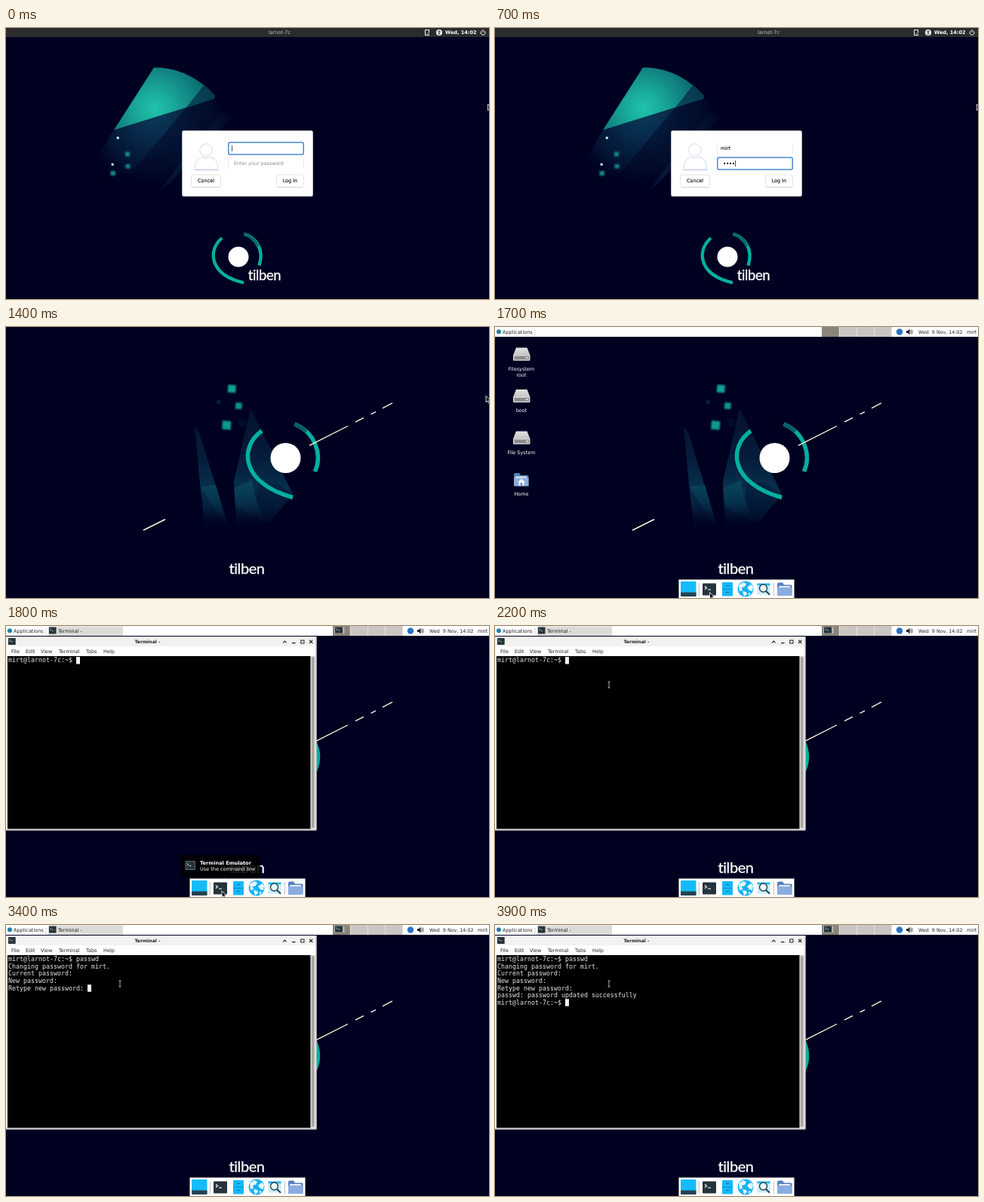
Recreate the animation shown at these times as an HTML page. Size 640 px wide and 360 px high, loop 4 s.

```html
<!DOCTYPE html>
<html lang="en">
<head>
<meta charset="utf-8">
<title>Password change</title>
<style>
html, body { margin: 0; width: 100%; height: 100%; overflow: hidden; background: #000021; }
svg { display: block; width: 640px; height: 360px; }
text { font: 6.5px "DejaVu Sans", sans-serif; fill: #222; white-space: pre; }
.b { font-weight: bold; }
.mid { text-anchor: middle; }
.lite text { fill: #fff; }
.word { font: 20px Lato, "Open Sans", sans-serif; fill: #fff; stroke: #fff; stroke-width: .3; text-anchor: middle; letter-spacing: -.4px; }
.mono { font: 8.3px "DejaVu Sans Mono", monospace; fill: #e8e8e8; }
</style>
</head>
<body>
<svg viewBox="0 0 640 360">
<defs>
  <radialGradient id="glow" gradientUnits="userSpaceOnUse" cx="197" cy="107" r="84">
    <stop offset="0" stop-color="#1fc4ac"/><stop offset=".3" stop-color="#19a899"/><stop offset=".65" stop-color="#108080"/><stop offset="1" stop-color="#0a5663"/>
  </radialGradient>
  <radialGradient id="haze" gradientUnits="userSpaceOnUse" cx="197" cy="112" r="108">
    <stop offset="0" stop-color="#0a3a5a"/><stop offset=".35" stop-color="#072849"/><stop offset=".7" stop-color="#041737" stop-opacity=".8"/><stop offset="1" stop-color="#000021" stop-opacity="0"/>
  </radialGradient>
  <linearGradient id="strip" gradientUnits="userSpaceOnUse" x1="290" y1="112" x2="205" y2="216">
    <stop offset="0" stop-color="#04102f" stop-opacity=".4"/><stop offset=".5" stop-color="#061d3d"/><stop offset="1" stop-color="#030f2f"/>
  </linearGradient>
  <linearGradient id="blade" gradientUnits="userSpaceOnUse" x1="0" y1="108" x2="0" y2="274">
    <stop offset="0" stop-color="#04122f"/><stop offset=".4" stop-color="#051d3b"/><stop offset=".64" stop-color="#06304d"/>
    <stop offset=".8" stop-color="#052443" stop-opacity=".8"/><stop offset="1" stop-color="#000021" stop-opacity="0"/>
  </linearGradient>
  <linearGradient id="lit" gradientUnits="userSpaceOnUse" x1="0" y1="200" x2="0" y2="270">
    <stop offset="0" stop-color="#0a5062"/><stop offset=".45" stop-color="#083c55" stop-opacity=".8"/><stop offset="1" stop-color="#000021" stop-opacity="0"/>
  </linearGradient>
  <linearGradient id="metal" x1="0" y1="0" x2="0" y2="1">
    <stop offset="0" stop-color="#e4e4e4"/><stop offset="1" stop-color="#c2c2c2"/>
  </linearGradient>
  <filter id="soft" x="-1" y="-1" width="3" height="3"><feGaussianBlur stdDeviation=".8"/></filter>

  <g id="term">
    <rect width="18" height="16" rx="1" fill="#25343c"/>
    <path d="M3 4l2.500 2L3 8M7 8.500h4" fill="none" stroke="#fff" stroke-width="1.200"/>
  </g>
  <g id="drive">
    <path d="M4 0h14.500l4 10H0z" fill="url(#metal)"/>
    <rect y="9.500" width="22.500" height="7.800" rx="1.200" fill="#d6d6d6"/>
    <rect x="1.500" y="11" width="19.500" height="4.800" fill="#8c8c8c"/>
    <rect x="17" y="12.300" width="2.500" height="2" fill="#e9e9e9"/>
  </g>
  <g id="folder">
    <path d="M0 2q0-2 2-2h5l2 3h9q1.500 0 1.500 1.500V17H0z" fill="#5680bd"/>
    <path d="M2 4.500h15v3H2z" fill="#e6ebf5"/>
    <path d="M0 6.500h19.500V16.500q0 1-1 1H1q-1 0-1-1z" fill="#8aace0"/>
  </g>
</defs>

<rect width="640" height="360" fill="#000021"/>

<g id="login">
  <path d="M143 135.500L239 105.500L276 94Q290 104 298 120L204 216L116 182Z" fill="url(#haze)"/>
  <path d="M239 105.500L276 94Q290 104 298 120L204 216L160 200Z" fill="#000021" opacity=".45"/>
  <path d="M196 52.500Q242 52 277 90L276 94L143 135.500Z" fill="url(#glow)"/>
  <path d="M263 75Q271 82 277 90L276 94L239 105.500Z" fill="#052a45" opacity=".7"/>
  <path d="M284 112Q293 112 298 120L218 205L204 216L232 178Z" fill="url(#strip)"/>
  <g filter="url(#soft)" fill="#0f8a83">
    <rect x="158" y="164.500" width="6" height="6"/><rect x="158.500" y="181" width="6" height="5.500"/><rect x="138.500" y="190" width="6.500" height="6"/>
  </g>
  <g fill="#c4fff4"><rect x="146.700" y="144.500" width="3" height="3"/><rect x="139.700" y="179.700" width="3" height="3"/></g>
  <g fill="none" stroke="#02b0a0" stroke-width="4.300">
    <path d="M286 279C266.500 296 270 328 315 338.300"/>
    <path d="M315.500 273.500C331 278 342.500 294 335.500 315.500"/>
    <path d="M315.500 273.500Q328 277.500 334 290" stroke="#0b6970"/>
  </g>
  <circle cx="308" cy="304" r="13.500" fill="#fff"/>
  <text class="word" x="342.500" y="334.500" style="font-size:18.500px">tilben</text>
</g>

<g id="greeter">
  <rect width="640" height="12" fill="#2a2c2e"/>
  <g class="lite">
    <text class="mid" x="362.500" y="8.300" style="fill:#c3c3c3">larnot-7c</text>
    <text class="b" x="582" y="8.300">Wed, 14:02</text>
  </g>
  <g fill="none" stroke="#fff">
    <path d="M560.500 9.500h-5v-7h5v4M558 6.500l3 3"/>
    <path d="M630.300 3.700a3 3 0 1 0 3.400 0M632 2v4"/>
  </g>
  <circle cx="574" cy="6" r="4" fill="#fff"/>
  <path d="M571.700 5h4.600M574 4.500v2.200l-1.300 2.300M574 6.700l1.300 2.300" fill="none" stroke="#2a2c2e" stroke-width=".9"/>
  <circle cx="574" cy="3.500" r=".7" fill="#2a2c2e"/>
  <rect x="233.500" y="136.500" width="173" height="87" rx="2" fill="#fff" stroke="#b9b9c2"/>
  <g fill="#fff" stroke="#cbd1e2" stroke-width=".8">
    <circle cx="265" cy="162" r="8.200"/>
    <path d="M250 188.500C250 176 256 171.500 260 171.500Q265 174.500 270 171.500C275 171.500 281 176 281 188.500Z"/>
    <path d="M250 188.500h31" stroke="#aab6d8"/>
  </g>
  <g fill="#fff" stroke="#dedede" stroke-width=".8">
    <rect x="245.500" y="195" width="39" height="16.500" rx="2"/>
    <rect x="358.500" y="195" width="36" height="16.500" rx="2"/>
  </g>
  <path d="M247 211.700h36M360 211.700h33" stroke="#c9c9c9" stroke-width=".7"/>
  <text class="mid" x="265" y="205.200" stroke="#222" stroke-width=".15">Cancel</text>
  <text class="mid" x="376.300" y="205.200" stroke="#222" stroke-width=".15">Log In</text>
  <path d="M294.500 153v14M394.500 153v14M294.500 173v14M394.500 173v14" stroke="#ececec"/>
  <rect id="focus" x="294.800" width="99.400" height="16" rx="2" fill="#fff" stroke="#4b86d2" stroke-width="1.500"/>
  <text id="user" x="299" y="162.300" stroke="#222" stroke-width=".15"></text>
  <text id="hint" x="302" y="182.300" style="font-size:6.400px;fill:#8a8a8a">Enter your password</text>
  <g id="dots" fill="#222"></g>
  <path id="caret" d="M0 0v8" stroke="#222" stroke-width=".8"/>
</g>

<g id="desk">
  <rect width="640" height="360" fill="#000021"/>
  <g fill="url(#blade)">
    <path d="M250 133L256 140L298 276L264 270L257 208Z"/>
    <path d="M324 108L340 140L380 222L350 258L306 272L302 205Z"/>
  </g>
  <path d="M258 212L278 210L288 243L298 276Z" fill="url(#lit)" opacity=".75"/>
  <path d="M302 214L326 203Q331 243 346 260L304 238Z" fill="url(#lit)" opacity=".75"/>
  <path d="M334 207Q360 203 378 222L352 258Q326 240 334 207Z" fill="#02102e" opacity=".4"/>
  <g id="bits" filter="url(#soft)"></g>
  <g fill="none" stroke="#02b0a0" stroke-width="5.500">
    <path d="M339 138C308 160 312 208 380 226.500"/>
    <path d="M382.500 129C408 139 420 168 409.500 192"/>
    <path d="M382.500 129Q391 132.500 398 139" stroke="#0a5f6a"/>
  </g>
  <circle cx="370.500" cy="174" r="20" fill="#fff"/>
  <path d="M402 157.300L453 131.500M463 126.200L474 120.600M483.500 115.900L490 112.700M499 107.800L512 101M182 270L211 255.500" stroke="#fff8e0" stroke-width="1.400"/>
  <text class="word" x="319" y="328">tilben</text>
</g>

<g id="shell">
  <use href="#drive" x="24" y="27.500"/><use href="#drive" x="24" y="83"/><use href="#drive" x="24" y="138.500"/>
  <use href="#folder" x="25" y="194"/>
  <path d="M30 206l5-4.500 5 4.500h-1.300v4.500h-7.400V206z" fill="#f4f6fb"/><path d="M33.800 207h2.400v3.500h-2.400z" fill="#5b7fbc"/>
  <g class="lite mid">
    <text x="35" y="58">Filesystem</text><text x="35" y="66">root</text>
    <text x="35" y="113.300">boot</text><text x="35" y="169">File System</text><text x="35" y="224.300">Home</text>
  </g>
  <rect width="640" height="13" fill="#fff"/>
  <circle cx="5" cy="6.300" r="3" fill="#1c82a6"/>
  <text x="10" y="8.600">Applications</text>
  <path d="M53 4v1M53 6.500v1M53 9v1" stroke="#999"/>
  <rect x="433" width="92.500" height="13" fill="#c9c6c3"/>
  <rect x="433" width="23" height="13" fill="#8b8479"/>
  <path d="M456.300 0v13M479.500 0v13M502.500 0v13" stroke="#ecebea" stroke-width=".8"/>
  <circle cx="536" cy="6.500" r="4.200" fill="#2a72c0"/>
  <path d="M545 5h2l2.500-2.500v8L547 8h-2z" fill="#222"/>
  <path d="M550.500 4.500q1.300 2 0 4M552 3.300q2 3.200 0 6.400" fill="none" stroke="#222" stroke-width=".8"/>
  <text x="561" y="8.600" style="font-size:6.350px">Wed  9 Nov, 14:02</text>
  <text x="625" y="8.600">mirt</text>
</g>

<g id="win">
  <rect x="56" y=".5" width="99" height="12.500" fill="#dddbd8"/>
  <use href="#term" transform="translate(57 1.500) scale(.53 .56)"/>
  <text x="69" y="8.600">Terminal -</text>
  <rect x="435" y="1.500" width="13.500" height="8.500" fill="#b9b6b1"/>
  <use href="#term" transform="translate(436 1.500) scale(.56 .5)"/>
  <rect x="0" y="14" width="411.500" height="257.500" fill="#f3f2f1"/>
  <path d="M411 14v257H0" fill="none" stroke="#b5b2ae"/>
  <rect x="1" y="27" width="409" height="13" fill="#fff"/>
  <rect x="2" y="40" width="401.500" height="229.500" fill="#000"/>
  <rect x="404" y="40" width="5.500" height="229.500" fill="#d9d7d4"/>
  <rect x="405" y="41" width="3.500" height="227" rx="1.700" fill="#a9a6a2"/>
  <use href="#term" transform="translate(3 16) scale(.54 .56)"/>
  <text class="b mid" x="187.500" y="23.400" style="font-size:6.100px">Terminal -</text>
  <path d="M367 22.300l2.300-2.300 2.300 2.300M379 22.600h4.500M402 18.700l4.300 4.300M406.300 18.700l-4.300 4.300" fill="none" stroke="#222" stroke-width="1.100"/>
  <rect x="390.700" y="19" width="4.300" height="4" fill="none" stroke="#222"/>
  <g id="menu"></g>
  <g id="lines"></g>
  <rect id="block" x="93" width="5" height="9.500" fill="#f4f4f4"/>
</g>

<g id="tip" class="lite">
  <rect x="232" y="304" width="104.500" height="30" rx="2" fill="#000" opacity=".88"/>
  <use href="#term" transform="translate(238 312.500) scale(.68 .7)"/>
  <rect x="238" y="312.500" width="12.200" height="11.200" fill="none" stroke="#8fa0a8" stroke-width=".6"/>
  <text class="b" x="257" y="316.500" style="font-size:6.600px">Terminal Emulator</text>
  <text x="257" y="325">Use the command line</text>
</g>

<g id="dock">
  <rect x="243.500" y="335.500" width="153" height="24.500" fill="#fff"/>
  <rect x="246" y="338" width="20.500" height="20" rx="1" fill="#14bcfb"/>
  <path d="M246 352.500h20.500V357q0 1-1 1H247q-1 0-1-1z" fill="#26424f"/>
  <path d="M270.300 340v17M369.300 340v17" stroke="#bdbdbd"/>
  <use href="#term" x="275" y="340.500"/>
  <rect x="301" y="339" width="14" height="18.500" rx="1" fill="#14b8fb"/>
  <path d="M301 348.300h14" stroke="#1386b5" stroke-width=".8"/>
  <path d="M306 343.500h4M306 352.500h4" stroke="#0f6e96"/>
  <circle cx="332" cy="348" r="10.500" fill="#16b2f5"/>
  <path d="M323 343l6-4 4 2-2 4-4 1 1 4-4 1zM334 346l5-4 3 3-1 6-4-1zM328 351l5 1 1 3-4 3zM336 353l3 1-3 3z" fill="#e6f7fd"/>
  <rect x="347.500" y="340" width="17" height="15.500" fill="#c9ecf8"/>
  <path d="M347.500 342h17" stroke="#20b6f0" stroke-width="2.500"/>
  <circle cx="355.500" cy="347" r="5" fill="#eafaff" stroke="#28404c" stroke-width="1.400"/>
  <path d="M359 350.800l5 5" stroke="#28404c" stroke-width="2"/>
  <use href="#folder" x="374" y="339.500"/>
</g>

<path id="arrow" d="M0 0v8.500l2-1.800 1.500 3 1.400-.7L3.500 6.200h2.600z" fill="#111" stroke="#fff" stroke-width=".8"/>
<path id="beam" d="M-1.500-4h3M0-4v8M-1.500 4h3" fill="none" stroke="#d8d8d8" stroke-width=".8"/>
</svg>

<script>
const $ = id => document.getElementById(id);
const show = (id, on) => $(id).setAttribute("visibility", on ? "visible" : "hidden");
const move = (id, x, y) => $(id).setAttribute("transform", `translate(${x} ${y})`);

const USER = "mirt", PROMPT = USER + "@larnot-7c:~$ ", COMMAND = "passwd";
const ROW = 9.55;

// wallpaper squares: centre x, centre y, size, colour
$("bits").innerHTML = [
  [299.3, 82, 10.5, "#10a094"], [308.3, 104.8, 8.5, "#0f978c"], [292.3, 130.5, 11.5, "#10998f"],
  [282, 99.5, 5, "#07283f"], [313, 127, 10, "#030c2a"]
].map(([x, y, s, c]) =>
  `<rect x="${x - s / 2}" y="${y - s / 2}" width="${s}" height="${s}" fill="${c}" transform="rotate(4 ${x} ${y})"/>`
).join("");

$("menu").innerHTML = [["File", 7], ["Edit", 26], ["View", 46], ["Terminal", 70], ["Tabs", 106], ["Help", 129]]
  .map(([label, x]) => `<text x="${x}" y="36.400">${label}</text>`).join("");
$("dots").innerHTML = [0, 1, 2, 3].map(i => `<circle cx="${304.2 + i * 3.9}" cy="180" r="1.150"/>`).join("");
$("lines").innerHTML = [...Array(7).keys()]
  .map(i => `<text class="mono" x="3" y="${48.3 + i * ROW}"></text>`).join("");

// pointer path: step, x, y
const PATH = [[0, 638.5, 101], [10, 638.5, 101], [13, 636, 91.5], [14, 636, 91.5],
  [17, 284.5, 352.5], [18, 286, 352], [22, 151, 78], [40, 151, 78]];

function pointer(s) {
  const i = PATH.findIndex(p => p[0] > s);
  const [t0, x0, y0] = PATH[i - 1], [t1, x1, y1] = PATH[i];
  const k = (s - t0) / (t1 - t0);
  return [x0 + (x1 - x0) * k, y0 + (y1 - y0) * k];
}

function terminal(s) {
  const typed = Math.max(0, Math.min(COMMAND.length, (s - 22) * 2));
  const out = [PROMPT + COMMAND.slice(0, typed)];
  if (s >= 26) out.push(`Changing password for ${USER}.`, "Current password: ");
  if (s >= 29) out.push("New password: ");
  if (s >= 34) out.push("Retype new password: ");
  if (s >= 37) out.push("passwd: password updated successfully", PROMPT);
  return out;
}

function drawLogin(s) {
  const onPass = s >= 5;
  const dots = onPass ? Math.min(4, (s - 5) * 2) : 0;
  $("focus").setAttribute("y", onPass ? 172 : 152);
  $("user").textContent = USER.slice(0, s);
  [...$("dots").children].forEach((d, i) => d.setAttribute("opacity", i < dots ? 1 : 0));
  $("hint").setAttribute("opacity", dots ? 0 : 1);
  const x = onPass ? 302.9 + dots * 3.9 : 299.5 + $("user").getComputedTextLength();
  move("caret", x, onPass ? 176 : 156);
}

function drawTerminal(s) {
  const out = terminal(s), last = out.length - 1;
  [...$("lines").children].forEach((el, i) => el.textContent = out[i] || "");
  $("block").setAttribute("x", 3 + out[last].length * 5);
  $("block").setAttribute("y", 41 + last * ROW);
}

function draw(ms) {
  const s = Math.floor(ms % 4000 / 100);
  show("login", s < 14);
  show("greeter", s < 8);
  show("desk", s >= 14);
  show("shell", s >= 15);
  show("dock", s >= 15);
  show("win", s >= 18);
  show("tip", s >= 18 && s < 20);
  $("tip").setAttribute("opacity", s === 18 ? 1 : .5);
  if (s < 8) drawLogin(s);
  if (s >= 18) drawTerminal(s);
  const [x, y] = pointer(s);
  const overText = s >= 18 && y < 270;
  show("arrow", !overText);
  show("beam", overText);
  move("arrow", x, y);
  move("beam", x, y);
}

let start;
function tick(now) {
  start ??= now;
  draw(now - start);
  requestAnimationFrame(tick);
}
draw(0);
requestAnimationFrame(tick);
</script>
</body>
</html>
```
